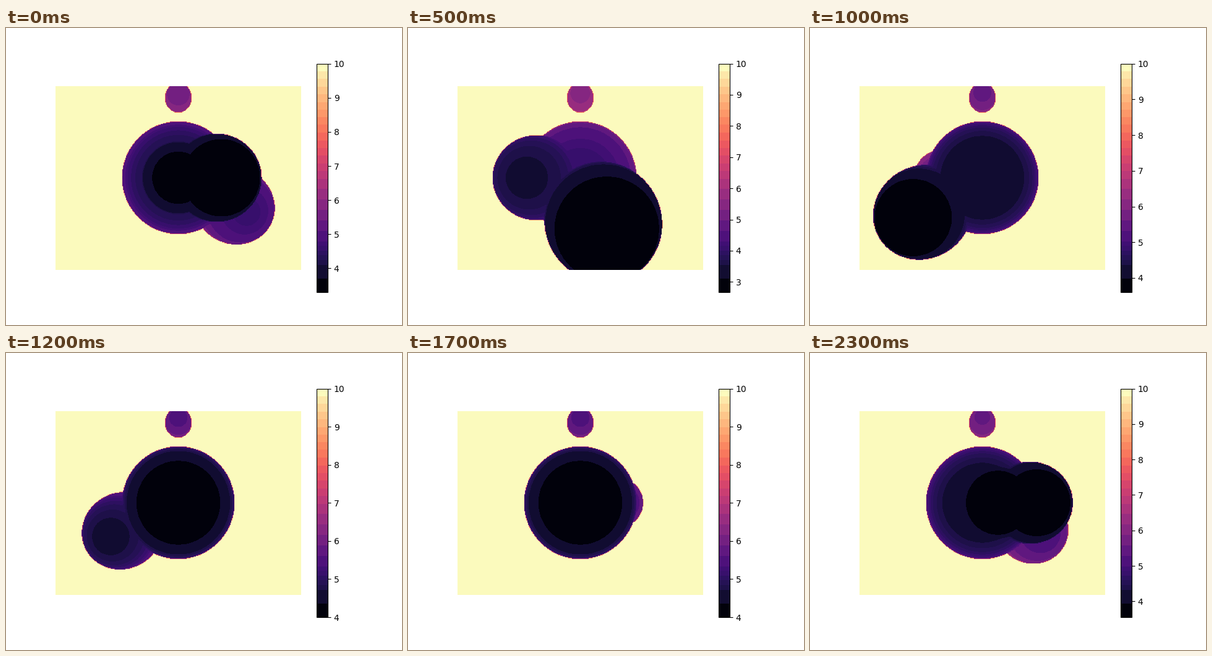
Recreate the animation shown at these times as a matplotlib script. Size 640 px wide and 480 px high, loop 2.4 s.

```python
import numpy as np
import matplotlib.pyplot as plt
from matplotlib.animation import FuncAnimation
from matplotlib.colors import ListedColormap

FRAMES, INTERVAL = 24, 100
W, H = 320, 240
CAMERA_DIST, FAR = 6.0, 10.0
SKIN = 0.002  # rays passing this close count as hits

# x, y, z and radius; the whole scene turns around the vertical axis
SPHERES = [
    (0, 0, 0, 2.0),
    (0, 3, 0, 0.5),
    (1, 0, -1.5, 1.2),
    (0, 0, -1.5, 1.0),
    (2, -1, 0, 1.4),
]

half = np.tan(np.radians(30))
RAY_X, RAY_Y = np.meshgrid(np.linspace(-1, 1, W) * half * W / H,
                           np.linspace(1, -1, H) * half)
RAY_SQ = RAY_X**2 + RAY_Y**2 + 1


def banded_magma():
    """Magma in 28 flat bands: wide, then narrow, then even ones."""
    edges = np.interp(np.arange(29), [0, 2, 7, 13, 28],
                      [0, 0.12, 0.223, 0.497, 1])
    mids = (edges[:-1] + edges[1:]) / 2
    mids[0], mids[-1] = 0.02, 0.995
    steps = (np.arange(512) + 0.5) / 512
    band = np.searchsorted(edges, steps, side="right") - 1
    return ListedColormap(plt.get_cmap("magma")(mids[band]))


def depth_map(angle):
    """Depth along the view axis of the nearest sphere on every ray."""
    depth = np.full((H, W), FAR)
    c, s = np.cos(angle), np.sin(angle)
    for x, y, z, radius in SPHERES:
        r = radius + SKIN
        cx, cz = x * c + z * s, z * c - x * s + CAMERA_DIST
        b = RAY_X * cx + RAY_Y * y + cz
        disc = b**2 - RAY_SQ * (cx**2 + y**2 + cz**2 - r**2)
        hit = (b - np.sqrt(np.maximum(disc, 0))) / RAY_SQ
        depth = np.where(disc > 0, np.minimum(depth, hit), depth)
    return depth


fig, ax = plt.subplots(figsize=(6.4, 4.8), dpi=100)
ax.axis("off")
first = depth_map(0)
image = ax.imshow(first, cmap=banded_magma(), vmin=first.min(), vmax=FAR)
fig.colorbar(image, ax=ax)


def update(i):
    depth = depth_map(2 * np.pi * i / FRAMES)
    image.set_data(depth)
    image.set_clim(depth.min(), FAR)
    return [image]


anim = FuncAnimation(fig, update, frames=FRAMES, interval=INTERVAL,
                     repeat=True, repeat_delay=0, blit=False)
plt.show()
```
